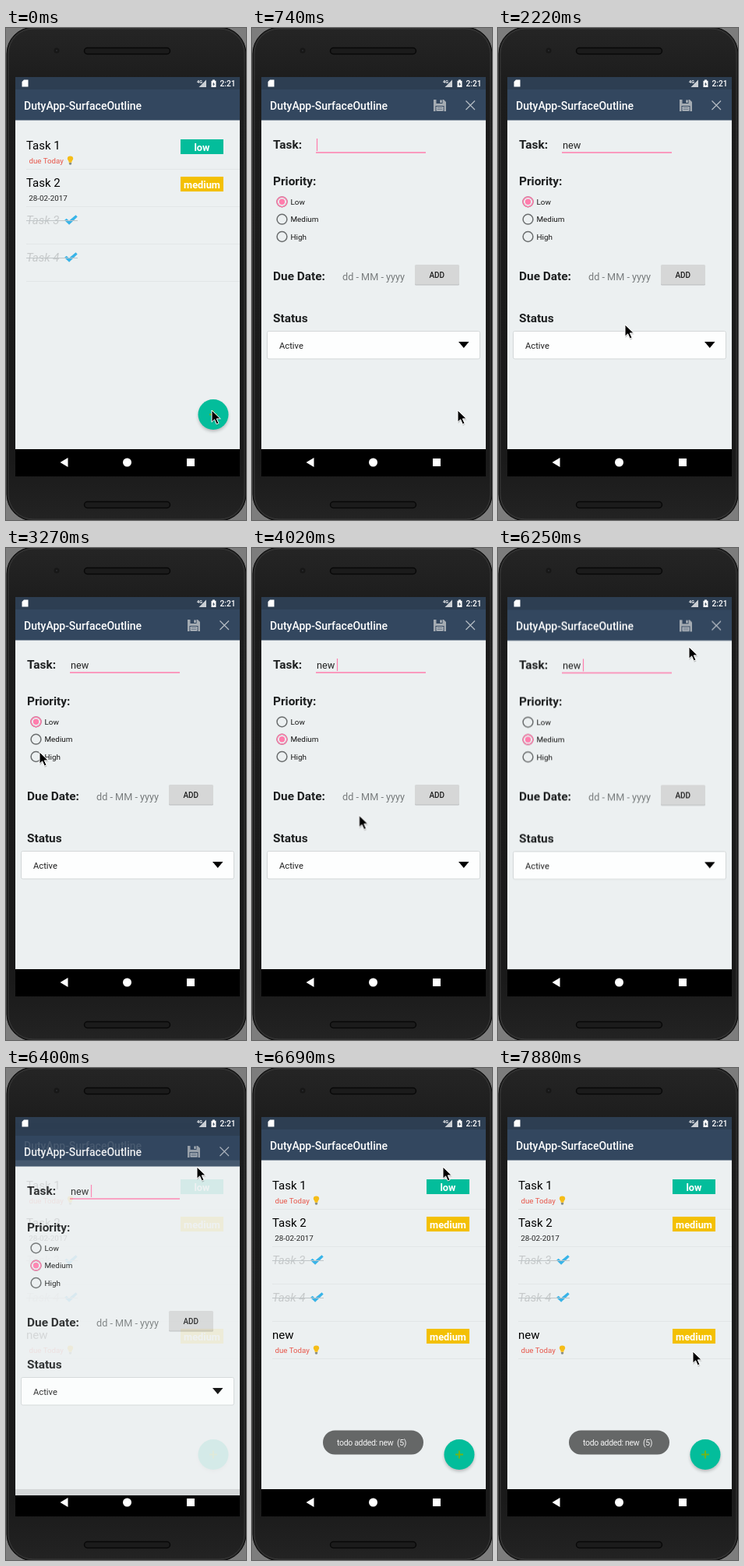
These frames come from a looping animation (308x632 px, 8000 ms). An HTML page:

```html
<!DOCTYPE html>
<html lang="en">
<head>
<meta charset="utf-8">
<title>Todo demo</title>
<style>
html, body { margin: 0; width: 100%; height: 100%; overflow: hidden; background: #7d7d7d; }
svg { display: block; width: 308px; height: 632px; font-family: Roboto, sans-serif; }
text { white-space: pre; }

.head { font: 500 14px Roboto, sans-serif; fill: #fff; }
.task { font-size: 15px; fill: #000; }
.done { font-style: italic; fill: #c6c9ca; }
.due { font-size: 9.7px; fill: #e8574b; }
.chip { font-weight: 700; font-size: 12.8px; fill: #fff; text-anchor: middle; }
.label { font-weight: 700; font-size: 15.4px; fill: #1d1f20; }
.option { font-size: 9.9px; fill: #151515; }
.ring { fill: none; stroke: #6a6d6e; stroke-width: 1.5; }
.on { fill: none; stroke: #ff7ead; stroke-width: 1.5; }
.rule { stroke: #e2e6e7; }

/* Everything shares one 8 s clock and changes in hard steps. */
.a { animation: 8s step-end infinite; }

.cursor { animation-name: cursor; }
@keyframes cursor {
  0% { transform: translate(264px, 491px); }
  26% { transform: translate(222px, 445px); }
  27.7% { transform: translate(163px, 381px); animation-timing-function: steps(4); }
  35.2% { transform: translate(72px, 285px); animation-timing-function: steps(2); }
  38.9% { transform: translate(47px, 266px); }
  40.8% { transform: translate(43px, 262px); animation-timing-function: steps(2); }
  44.5% { transform: translate(42px, 246px); }
  48.3% { transform: translate(90px, 290px); animation-timing-function: steps(2); }
  52.1% { transform: translate(185px, 397px); }
  57.7% { transform: translate(201px, 374px); animation-timing-function: steps(2); }
  61.4% { transform: translate(233px, 327px); }
  65.2% { transform: translate(234px, 295px); animation-timing-function: steps(5); }
  74.3% { transform: translate(242px, 101px); }
  78.1% { transform: translate(245px, 127px); }
  94.8% { transform: translate(247px, 195px); animation-timing-function: steps(2); }
  98.4%, 100% { transform: translate(250px, 364px); }
}

.form { animation-name: form; }
@keyframes form {
  0% { opacity: 0; transform: none; }
  7.3% { opacity: .85; transform: translateY(4px); }
  9.2% { opacity: 1; transform: none; }
  78.1% { opacity: 1; transform: translateY(.4px); }
  79.9% { opacity: .9; transform: translateY(8px); }
  81.7% { opacity: .3; transform: translateY(30px); }
  83.5%, 100% { opacity: 0; transform: none; }
}

.press { animation-name: press; }
@keyframes press { 0% { opacity: 0; } 3.6% { opacity: 1; } 9.2%, 100% { opacity: 0; } }

.added { animation-name: added; }
@keyframes added { 0% { opacity: 0; } 78.1%, 100% { opacity: 1; } }

.toast { animation-name: toast; }
@keyframes toast { 0% { opacity: 0; } 81.7% { opacity: .6; } 83.5%, 100% { opacity: 1; } }

.n { animation-name: n; }
.e { animation-name: e; }
.w { animation-name: w; }
@keyframes n { 0% { opacity: 0; } 18.6%, 100% { opacity: 1; } }
@keyframes e { 0% { opacity: 0; } 20.3%, 100% { opacity: 1; } }
@keyframes w { 0% { opacity: 0; } 22.2%, 100% { opacity: 1; } }

.caret { animation-name: advance, blink; }
@keyframes advance {
  0% { transform: translateX(83px); }
  18.6% { transform: translateX(90px); }
  20.3% { transform: translateX(97px); }
  22.2%, 100% { transform: translateX(109px); }
}
@keyframes blink {
  0%, 13%, 27.7%, 40.8%, 54%, 65.2% { opacity: 0; }
  9.2%, 18.6%, 33.4%, 46.4%, 59.6%, 70.8%, 100% { opacity: 1; }
}

.low { animation-name: low; }
.medium { animation-name: medium; }
@keyframes low { 0% { opacity: 1; } 46.4%, 100% { opacity: 0; } }
@keyframes medium { 0% { opacity: 0; } 46.4%, 100% { opacity: 1; } }
</style>
</head>
<body>
<svg viewBox="0 0 308 632">
  <defs>
    <linearGradient id="body" x2="0" y2="1">
      <stop offset="0" stop-color="#252525"/>
      <stop offset=".12" stop-color="#1c1c1c"/>
      <stop offset=".88" stop-color="#1a1a1a"/>
      <stop offset="1" stop-color="#232323"/>
    </linearGradient>
    <clipPath id="screen"><path d="M12 63h288v513H12z"/></clipPath>
    <filter id="blur" x="-50%" y="-50%" width="200%" height="200%"><feGaussianBlur stdDeviation="2"/></filter>
    <g id="bulb">
      <path d="M-1.800 2.200C-1.800-.3-3.700-1-3.700-2.700a3.700 3.400 0 0 1 7.400 0C3.700-1 1.800-.3 1.800 2.200z" fill="#f5bd18"/>
      <path d="M-1.600 2.400h3.200v1.700L.8 5.200h-1.600l-.8-1.100z" fill="#8a8f86"/>
    </g>
    <path id="tick" d="M75 247l2.500-2.300 3.400 2.900 8.600-7.400 2.200 2.200-10.600 10.400z" fill="#38b4e8"/>
    <rect id="speaker" x="100.500" width="110" height="8" rx="4" fill="#1b1b1b" stroke="#080808" stroke-width="1.500"/>
    <path id="chip" d="M224 0h55v19h-55z"/>
    <g id="due">
      <text class="due" x="29.500" y="174">due Today</text>
      <use href="#bulb" x="82.500" y="170.500"/>
    </g>
    <g id="bars">
      <path d="M12 63h288v16H12z" fill="#2d3e52"/>
      <path d="M12 79h288v39.500H12z" fill="#33475f"/>
      <text class="head" x="23" y="104.500">DutyApp-SurfaceOutline</text>
    </g>
  </defs>

  <!-- phone -->
  <rect x="1" y="-1" width="307" height="634" rx="34" fill="url(#body)" stroke="#0b0b0b"/>
  <rect x="3" y="1" width="303" height="630" rx="32" fill="none" stroke="#3a3a3a"/>
  <use href="#speaker" y="25.500"/>
  <use href="#speaker" y="608.500"/>
  <circle cx="65" cy="29" r="3.500" fill="#171717"/>
  <circle cx="65" cy="29" r="1" fill="#2c2e31"/>

  <g clip-path="url(#screen)">
    <path d="M12 63h288v513H12z" fill="#ecf0f1"/>
    <use href="#bars"/>

    <!-- list -->
    <path class="rule" d="M26 181.500h274M26 229.500h274M26 277.500h274M26 325.500h274"/>
    <text class="task" x="26" y="156">Task 1</text>
    <use href="#due"/>
    <use href="#chip" y="143" fill="#03bd9b"/>
    <text class="chip" x="251.500" y="157.500">low</text>
    <text class="task" x="26" y="204">Task 2</text>
    <text x="29.300" y="222" font-size="9.800" fill="#222">28-02-2017</text>
    <use href="#chip" y="191" fill="#f3c004"/>
    <text class="chip" x="251.500" y="205.500">medium</text>
    <text class="task done" x="26" y="252">Task 3</text>
    <text class="task done" x="26" y="300">Task 4</text>
    <use href="#tick"/>
    <use href="#tick" y="48"/>
    <path d="M26 247.500h66M26 295.500h66" stroke="#bfc5c7"/>

    <g class="a added">
      <path class="rule" d="M26 373.500h274"/>
      <text class="task" x="26" y="348">new</text>
      <use href="#due" y="192"/>
      <use href="#chip" y="335" fill="#f3c004"/>
      <text class="chip" x="251.500" y="349.500">medium</text>
    </g>

    <circle cx="266" cy="499" r="19" opacity=".25" filter="url(#blur)"/>
    <circle class="a press" cx="266" cy="501" r="18" fill-opacity=".15" filter="url(#blur)"/>
    <circle cx="266" cy="496.500" r="19.500" fill="#03bd9b"/>
    <path d="M261 496.500h10M266 491.500v10" stroke="#6fb51c" stroke-width="2"/>

    <!-- navigation -->
    <path d="M12 541h288v35H12z"/>
    <g fill="#fff">
      <path d="M69.500 558l10-6v12zM232 553h10v10h-10z"/>
      <circle cx="155.500" cy="558" r="5.500"/>
    </g>

    <!-- form -->
    <g class="a form">
      <path d="M12 63h288v478H12z" fill="#ecf0f1"/>
      <use href="#bars"/>
      <path d="M233 92h13l3 3v12h-16z" fill="#a4abb2"/>
      <path d="M236.500 92h8v5h-8zM235.500 100h11v7h-11z" fill="#33475f"/>
      <path d="M236.500 101h9v5.500h-9zM241.500 92.500h2v3.500h-2z" fill="#c3c8cc"/>
      <path d="M237.500 102.500h7M237.500 104.500h7" stroke="#5b6a7c"/>
      <path d="M274.500 93.500l11.500 11.500M286 93.500L274.500 105" stroke="#b6bdc5" stroke-width="1.200"/>

      <text class="label" x="27" y="155">Task:</text>
      <g font-size="12.700" fill="#222">
        <text class="a n" x="83" y="155">n</text>
        <text class="a e" x="90" y="155">e</text>
        <text class="a w" x="96.700" y="155">w</text>
      </g>
      <path d="M82 160h141" stroke="#ff7ead" stroke-width="1.500"/>
      <path class="a caret" d="M.5 142v16" stroke="#ff7ead" stroke-width="1.200"/>

      <text class="label" x="27" y="202">Priority:</text>
      <circle class="ring" cx="38.500" cy="223.300" r="6.400"/>
      <circle class="ring" cx="38.500" cy="245.700" r="6.400"/>
      <circle class="ring" cx="38.500" cy="268" r="6.400"/>
      <g class="a low">
        <circle class="on" cx="38.500" cy="223.300" r="6.400"/>
        <circle cx="38.500" cy="223.300" r="3.700" fill="#ff7ead"/>
      </g>
      <g class="a medium">
        <circle class="on" cx="38.500" cy="245.700" r="6.400"/>
        <circle cx="38.500" cy="245.700" r="3.700" fill="#ff7ead"/>
      </g>
      <text class="option" x="49.500" y="227">Low</text>
      <text class="option" x="49.500" y="249.300">Medium</text>
      <text class="option" x="49.500" y="271.700">High</text>

      <text class="label" x="27" y="323.500">Due Date:</text>
      <text x="116" y="324.300" font-size="12.700" fill="#777b7c">dd - MM - yyyy</text>
      <rect x="209" y="305" width="57" height="25.500" rx="1.500" fill="#b9bcbd"/>
      <rect x="209" y="304" width="57" height="25.500" rx="1.500" fill="#d6d7d7"/>
      <text x="237.300" y="320.500" font-size="10" font-weight="500" fill="#1d1d1d" text-anchor="middle">ADD</text>

      <text class="label" x="27" y="377.500">Status</text>
      <rect x="19.500" y="389.500" width="273" height="35.500" rx="2" fill="#fdfefe" stroke="#d3d7d8"/>
      <text x="35" y="411.500" font-size="11.200" fill="#1d1d1d">Active</text>
      <path d="M265 403h13.500l-6.750 8z"/>
    </g>

    <!-- status icons -->
    <g fill="#fff">
      <path d="M23 66.500h5.500v9h-8v-6.500z"/>
      <path d="M257 66.500V76h-9.500z" opacity=".75"/>
      <path d="M265 66.500h3v1.200h1.500V76h-6v-8.300h1.500z"/>
      <text x="245" y="70.800" font-size="5.500" font-weight="700">4G</text>
      <text x="274.500" y="75" font-size="10.200" font-weight="500">2:21</text>
    </g>
    <path d="M266.800 69.500l-1.800 3h1.300v2.300l1.800-3h-1.300z" fill="#2d3e52"/>

    <g class="a toast">
      <rect x="91" y="465.500" width="129" height="31" rx="15.500" fill="#656767"/>
      <text x="109" y="485" font-size="10.500" letter-spacing="-.33" fill="#f3f3f3">todo added: new  (5)</text>
    </g>
  </g>

  <g class="a cursor">
    <path d="M.5 2v15l3.600-3.400 2.700 6.100 2.700-1.200-2.700-5.900h5z" opacity=".2"/>
    <path d="M0 0v15.300l3.600-3.400 2.700 6.100 2.700-1.200-2.700-5.900h5z" stroke="#fff"/>
  </g>
</svg>
</body>
</html>
```
